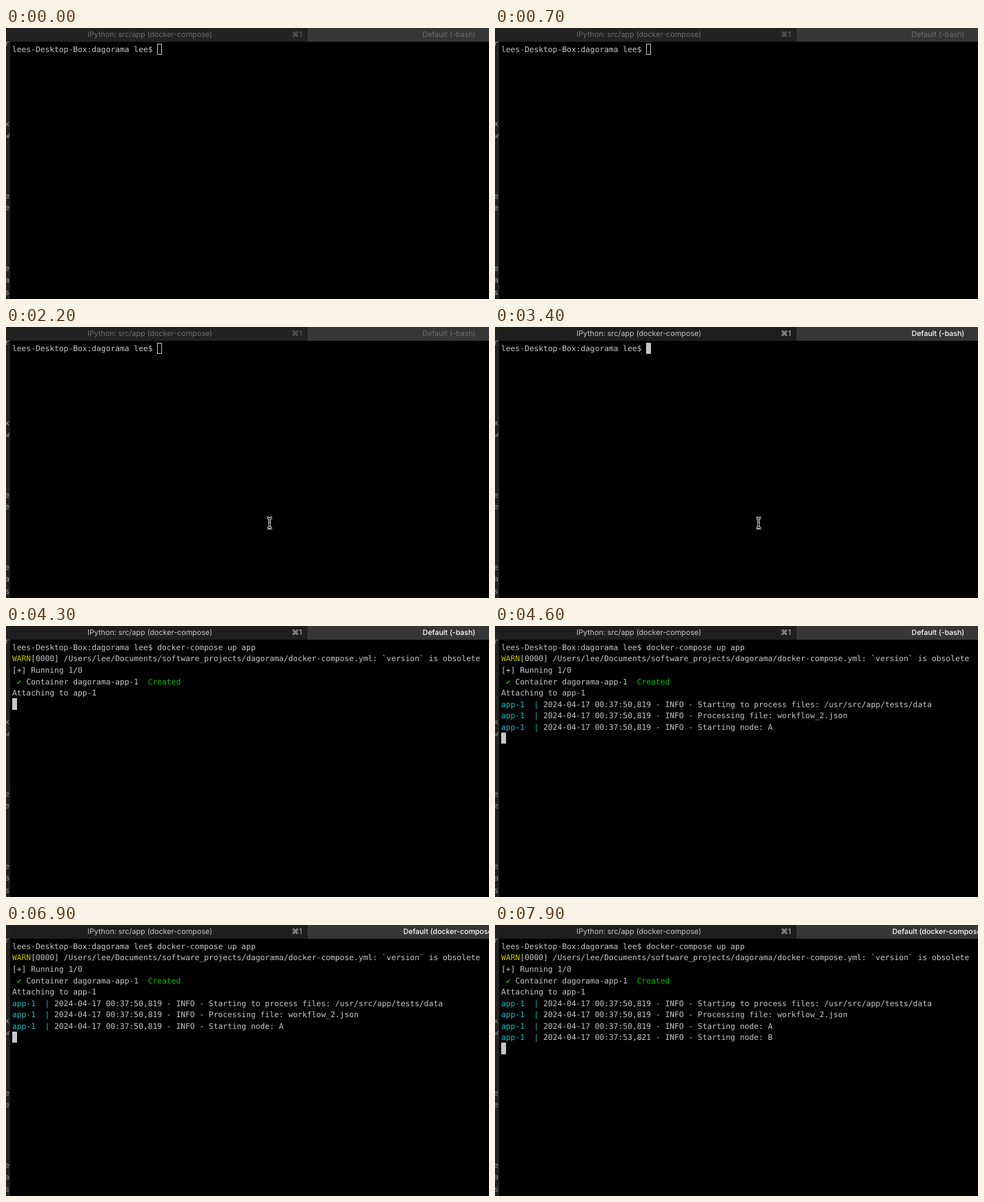
Animation of 700x394 px, one loop 8 s. Source, as an HTML page:

```html
<!DOCTYPE html>
<html lang="en">
<head>
<meta charset="utf-8">
<title>Terminal session</title>
<style>
  html, body { margin: 0; width: 100%; height: 100%; overflow: hidden; background: #000; }
  #stage { position: relative; width: 700px; height: 394px; overflow: hidden; background: #000;
    text-rendering: geometricPrecision; --text: #c7c7c7; }
  #stage div, #stage svg { position: absolute; }
  .edge { left: 0; top: 0; width: 6px; height: 394px; overflow: hidden; background: #222; }
  .edge div { right: 1px; color: #a0a0a0; font: 11.28px/16px "DejaVu Sans Mono", monospace; }
  .tab { top: 0; height: 19.5px; }
  .left { left: 6px; width: 431px; background: #222; }
  .right { left: 437px; width: 263px; background: #363636; }
  .title { top: 0; height: 19px; transform: translateX(-50%); white-space: pre;
    color: #6e6e6e; font: 10.75px/19px Inter, sans-serif; }
  .row { left: 9px; height: 16.5px; white-space: pre; color: var(--text);
    font: 11.28px/16.5px "DejaVu Sans Mono", monospace; }
  .cursor { box-sizing: border-box; width: 7px; height: 16.5px; border: 1px solid var(--text); }
  .warn { color: #c7c400; }
  .ok { color: #00c200; }
  .app { color: #20bcc4; }
  .focused .left { background: #1e1e1e; }
  .focused .title { color: #c4c4c4; }
  .focused .active { color: #fff; font-size: 10.55px; font-weight: 500; }
  .focused .cursor { background: var(--text); }
  .focused .edge div { color: #8c8c8c; }
</style>
</head>
<body>
<div id="stage">
  <div class="edge"></div>
  <div class="tab left"></div>
  <div class="tab right"></div>
  <div class="title" style="left:208.5px">IPython: src/app (docker-compose)</div>
  <div class="title" style="left:421.5px">⌘1</div>
  <div class="title active" style="left:642px"></div>
  <div class="cursor"></div>
  <svg id="arrow" width="14" height="20" viewBox="-2 -2 14 20">
    <path d="M0 0V14L3.2 11L5.4 16L7.8 15L5.6 10.1H9.6Z" fill="#000" stroke="#e6e6e6" stroke-width="1.3"/>
  </svg>
  <svg id="beam" width="12" height="20" viewBox="-6 -10 12 20" fill="none">
    <defs><path id="bar" d="M-3.5-7.5H-2L0-6L2-7.5H3.5M0-6V6M-3.5 7.5H-2L0 6L2 7.5H3.5M-2 2H2"/></defs>
    <use href="#bar" stroke="#dedede" stroke-width="3.4"/>
    <use href="#bar" stroke="#000" stroke-width="1.1"/>
  </svg>
</div>
<script>
const LOOP = 8000, CELL = 6.79, PITCH = 16.55, TEXT_TOP = 23.9, CURSOR_TOP = 22.5;
const FOCUS = 2500, RETITLE = 5000, BEAM = 1900, TYPED = 3600;
const stage = document.getElementById('stage');
const find = selector => stage.querySelector(selector);
const span = (kind, text) => `<span class="${kind}">${text}</span>`;
const log = (time, text) => span('app', 'app-1  |') + ` 2024-04-17 00:37:${time} - INFO - ${text}`;

// [start time, row, markup]
const lines = [
  [0, 0, 'lees-Desktop-Box:dagorama lee$ '],
  [TYPED, 0, ' '.repeat(31) + 'docker-compose up app'],
  [4100, 1, span('warn', 'WARN') + '[0000] /Users/lee/Documents/software_projects/dagorama/docker-compose.yml: `version` is obsolete'],
  [4100, 2, '[+] Running 1/0'],
  [4100, 3, ' ' + span('ok', '✔') + ' Container dagorama-app-1  ' + span('ok', 'Created')],
  [4200, 4, 'Attaching to app-1'],
  [4600, 5, log('50,819', 'Starting to process files: /usr/src/app/tests/data')],
  [4600, 6, log('50,819', 'Processing file: workflow_2.json')],
  [4600, 7, log('50,819', 'Starting node: A')],
  [7600, 8, log('53,821', 'Starting node: B')]
];
// [start time, column, row]
const cursorSteps = [[0, 31, 0], [TYPED, 52, 0], [3900, 0, 1], [4100, 0, 4], [4200, 0, 5], [4600, 0, 8], [7600, 0, 9]];
const edgeGlyphs = [['r', 22], ['x', 139], ['w', 156], ['e', 244], ['e', 261], ['e', 349], ['a', 366], ['s', 384]];

function add(parent, className, html, top) {
  const el = document.createElement('div');
  el.className = className;
  el.innerHTML = html;
  el.style.top = top + 'px';
  parent.append(el);
  return el;
}

edgeGlyphs.forEach(([glyph, y]) => add(find('.edge'), '', glyph, y - 7));
const rows = lines.map(([start, row, html]) => ({ start, el: add(stage, 'row', html, TEXT_TOP + row * PITCH) }));
const cursor = find('.cursor'), active = find('.active');
const arrow = find('#arrow'), beam = find('#beam');
stage.append(arrow, beam);
beam.style.left = '376px';
beam.style.top = '275px';

const show = (el, visible) => { el.style.visibility = visible ? 'visible' : 'hidden'; };

function render(t) {
  stage.classList.toggle('focused', t >= FOCUS);
  active.textContent = t < RETITLE ? 'Default (-bash)' : 'Default (docker-compose)';
  rows.forEach(({ start, el }) => show(el, t >= start));

  const [, column, row] = cursorSteps.filter(([start]) => t >= start).pop();
  cursor.style.left = 9 + column * CELL + 'px';
  cursor.style.top = CURSOR_TOP + row * PITCH + 'px';

  // The pointer glides in from below and settles.
  const rest = 1 - Math.min(1, Math.max(0, (t - 1000) / 300));
  arrow.style.left = 379 + 40 * rest ** 2 + 'px';
  arrow.style.top = 283 + 112 * rest ** 2 + 'px';
  show(arrow, t >= 1000 && t < BEAM);
  show(beam, t >= BEAM && t < TYPED);
}

const origin = performance.now();
function tick() {
  render((performance.now() - origin) % LOOP);
  requestAnimationFrame(tick);
}
render(0);
requestAnimationFrame(tick);
</script>
</body>
</html>
```
